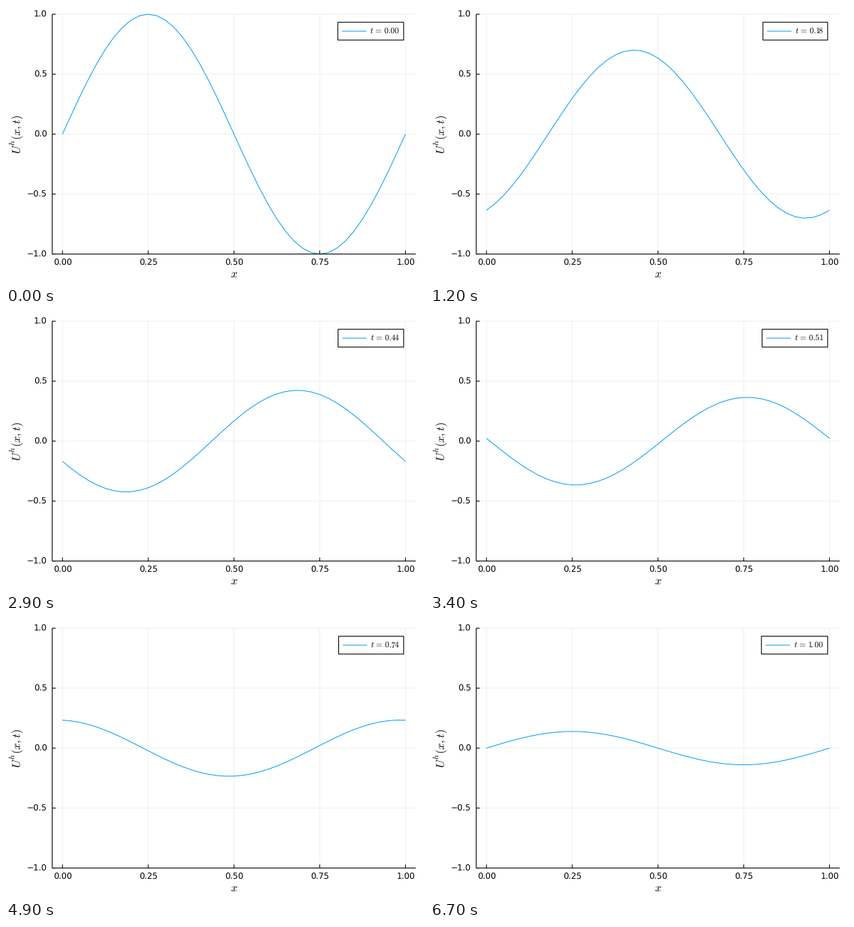
Recreate the animation shown at these times as a matplotlib script. Size 600 by 400 pixels, loop 6800 ms.

```python
import numpy as np
import matplotlib.pyplot as plt
from matplotlib.animation import FuncAnimation
from matplotlib.patches import Rectangle

plt.rcParams["font.family"] = "DejaVu Sans"
plt.rcParams["mathtext.fontset"] = "cm"
plt.rcParams["text.hinting"] = "none"

PX = 0.72                       # points per pixel at 100 dpi
LEFT, RIGHT, TOP, BOTTOM = 66.3, 588.2, 11.8, 355.6
FRAMES = 68
DT = 0.015
NU = 0.05                       # diffusion coefficient

fig = plt.figure(figsize=(6, 4), dpi=100, facecolor="white")
ax = fig.add_axes([0, 0, 1, 1])
ax.set(xlim=(0, 600), ylim=(400, 0))
ax.axis("off")


def sx(x):
    return LEFT + (x + 0.03) / 1.06 * (RIGHT - LEFT)


def sy(y):
    return TOP + (1 - y) / 2 * (BOTTOM - TOP)


def line(xs, ys, color="black", width=1.0, **kw):
    return ax.plot(xs, ys, color=color, lw=width * PX, snap=False,
                   solid_capstyle="butt", **kw)[0]


def label(x, y, s, size, **kw):
    return ax.text(x, y, s, fontsize=size * PX, **kw)


xticks = np.linspace(0, 1, 5)
yticks = np.linspace(-1, 1, 5)

for v in xticks:
    line([sx(v)] * 2, [TOP, BOTTOM], "#efefef", zorder=1)
for v in yticks:
    line([LEFT, RIGHT], [sy(v)] * 2, "#efefef", zorder=1)

line([LEFT, LEFT], [TOP, BOTTOM], width=1.1, zorder=3)
line([LEFT, RIGHT], [BOTTOM, BOTTOM], width=1.1, zorder=3)
for v in xticks:
    line([sx(v)] * 2, [BOTTOM, BOTTOM - 5], width=1.1, zorder=3)
    label(sx(v) + 0.2, 371.5, f"{v:.2f}", 12, ha="center", va="baseline")
for v in yticks:
    line([LEFT, LEFT + 5], [sy(v)] * 2, width=1.1, zorder=3)
    label(59, sy(v) + 3.9, f"{v:.1f}".replace("-", "\u2212"), 12,
          ha="right", va="baseline")

label(327, 388.5, "$x$", 16.5, ha="center", va="baseline")
up = dict(rotation=90, rotation_mode="anchor", ha="left", va="baseline")
label(20.5, 212.5, "$U$", 16.5, **up)
label(12.5, 199.5, "$h$", 11.6, **up)
label(20.5, 191.5, "$(x,t)$", 16.5, **up)

# Legend: the right edge is fixed, the left one follows the text.
BOX_RIGHT = RIGHT - (RIGHT - LEFT) / 30
BOX_TOP = TOP + (BOTTOM - TOP) / 30
BOX_H = 25.6
TEXT_END = 565.2
box = ax.add_patch(Rectangle((477, BOX_TOP), 94, BOX_H, fc="white", ec="black",
                             lw=1.1 * PX, snap=False, zorder=4))
key = line([483, 518], [BOX_TOP + BOX_H / 2] * 2, "#009afa", zorder=5)
note = label(TEXT_END, 40.1, "", 12, ha="right", va="baseline", zorder=5)

grid = np.linspace(0, 1, 41)
curve = line(sx(grid), sy(0 * grid), "#009afa", zorder=2)

KERN = {"1": -0.15, "4": -0.05, "7": -0.13}


def legend_text(t):
    rounded = np.floor(t * 100 + 0.5 + 1e-9) / 100
    digits = "".join(c + (rf"\hspace{{{KERN[c]}}}" if c in KERN else "")
                     for c in f"{rounded:.2f}")
    return rf"$t\hspace{{0.11}}=\hspace{{0.11}}{digits}$"


def update(i):
    t = min(i * DT, 1)
    u = np.exp(-4 * np.pi**2 * NU * t) * np.sin(2 * np.pi * (grid - t))
    curve.set_ydata(sy(u))
    note.set_text(legend_text(t))
    start = TEXT_END - note.get_window_extent().width
    box.set_x(start - 46)
    box.set_width(BOX_RIGHT - (start - 46))
    key.set_xdata([start - 40, start - 5])
    return curve, note, box, key


anim = FuncAnimation(fig, update, frames=FRAMES, interval=100,
                     repeat=True, repeat_delay=0, blit=False)
plt.show()
```
